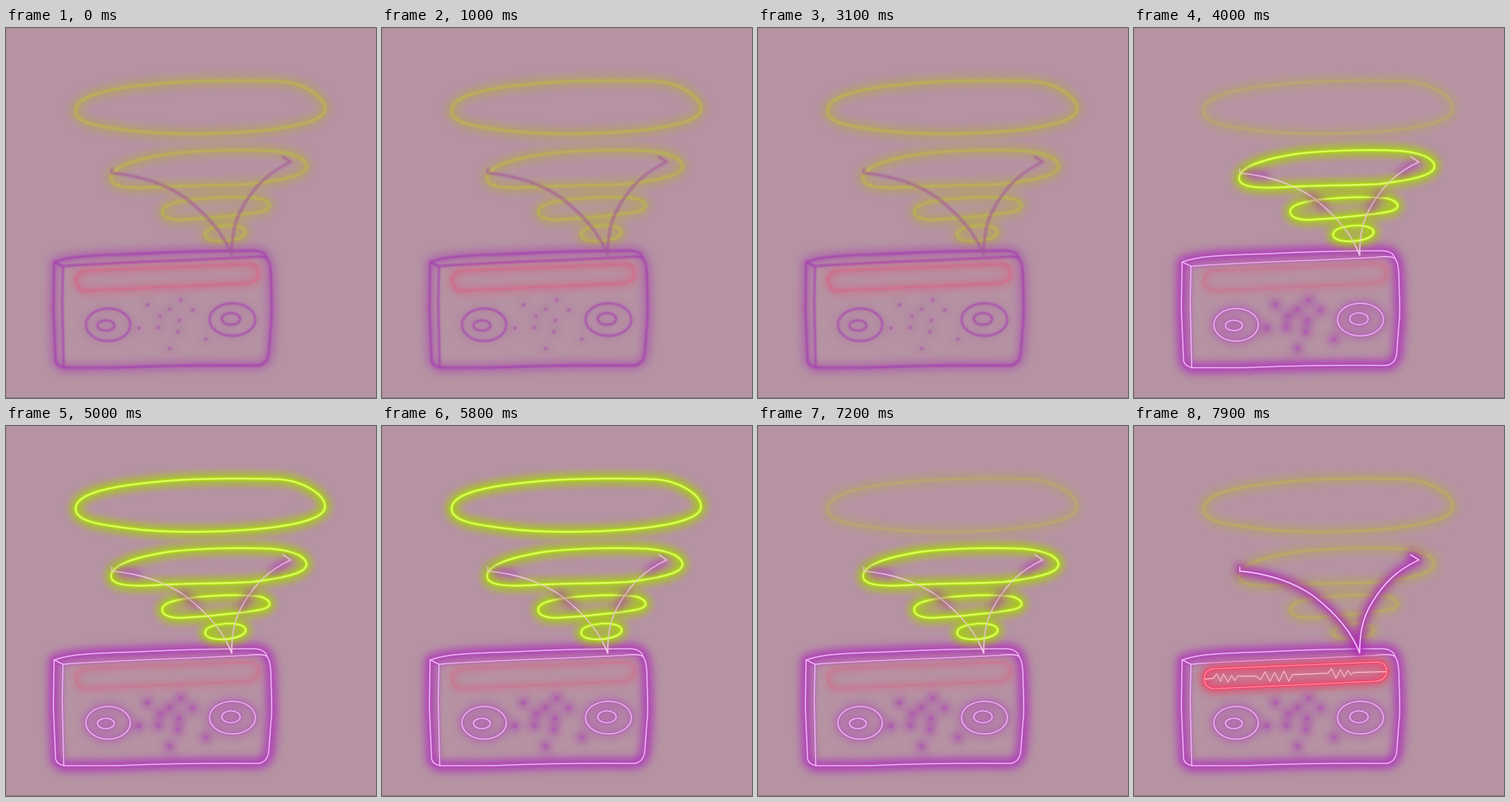
Write an HTML page that moves like this. It is 500 px wide and 500 px high and loops after 8000 ms.

```html
<!DOCTYPE html>
<html lang="en">
<head>
<meta charset="utf-8">
<title>Neon radio</title>
<style>
  html, body { margin: 0; width: 100%; height: 100%; overflow: hidden; background: #b693a3; }
  svg { display: block; width: 100vw; height: 100vh; }
  path, ellipse { fill: none; stroke-linecap: round; stroke-linejoin: round; }
  .glow { filter: url(#wide); }
  .soft { filter: url(#soft); }

  /* radio: blinks once a second, then stays on */
  .power, .idle, .beam, .tips, .ring-set, .tuned, .untuned, .faded { animation: 8s step-end infinite; }
  .power { animation-name: power; }
  .idle { animation-name: idle; }
  @keyframes power {
    0%, 12.5%, 25%, 37.5% { opacity: 0; }
    6.25%, 18.75%, 31.25%, 43.75%, 100% { opacity: 1; }
  }
  @keyframes idle {
    0%, 12.5%, 25%, 37.5% { opacity: 1; }
    6.25%, 18.75%, 31.25%, 43.75%, 100% { opacity: 0; }
  }

  /* the signal is sent from 3.5 s to 7.5 s */
  .ring-set, .tips { animation-name: send; }
  .beam { animation-name: rest; }
  .faded { animation-name: fade; }
  .tuned { animation-name: tune; }
  .untuned { animation-name: untune; }
  @keyframes send { 0%, 93.75% { opacity: 0; } 43.75% { opacity: 1; } }
  @keyframes rest { 0%, 93.75% { opacity: 1; } 43.75% { opacity: 0; } }
  @keyframes fade { 0% { opacity: 1; } 43.75% { opacity: .65; } 93.75%, 100% { opacity: .8; } }
  @keyframes tune { 0% { opacity: 0; } 93.75%, 100% { opacity: 1; } }
  @keyframes untune { 0% { opacity: 1; } 43.75%, 100% { opacity: .7; } }

  /* rings join one by one, every 200 ms */
  .r2, .r3, .r4 { animation: .8s step-end -.5s infinite; }
  .r2 { animation-name: second; }
  .r3 { animation-name: third; }
  .r4 { animation-name: fourth; }
  @keyframes second { 0% { opacity: 0; } 25%, 100% { opacity: 1; } }
  @keyframes third { 0% { opacity: 0; } 50%, 100% { opacity: 1; } }
  @keyframes fourth { 0% { opacity: 0; } 75%, 100% { opacity: 1; } }

  .halo { filter: url(#wide); stroke: #a4d010; stroke-width: 12px; opacity: .9; }
  .tube { filter: url(#soft); stroke: #b2ec08; stroke-width: 4px; }
  .core { stroke: #e2ff6c; stroke-width: 2px; }
</style>
</head>
<body>
<svg viewBox="0 0 500 500">
  <defs>
    <filter id="wide" filterUnits="userSpaceOnUse" x="0" y="0" width="500" height="500"><feGaussianBlur stdDeviation="6"/></filter>
    <filter id="soft" filterUnits="userSpaceOnUse" x="0" y="0" width="500" height="500"><feGaussianBlur stdDeviation=".8"/></filter>

    <path id="outline" d="M65 316C90 307 130 307 180 305C240 302 300 301 335 301Q350 301 354 312Q358 320 358 340Q360 390 359 400L356 440Q353 455 340 456C260 455 200 457 150 459L78 460Q69 457 67 450L64 380Z"/>
    <g id="case">
      <path d="M66 316C90 307 130 307 180 305C240 302 300 301 335 301Q350 301 353 312"/>
      <path d="M65 316L77 322C130 318 180 316 240 314L325 310Q349 307 353 312Q358 318 358 340Q360 390 358 400L355 440Q353 455 340 456C260 455 200 457 150 459L78 459Q69 457 67 450L64 380Z"/>
      <path d="M77 322L76 370L78 459"/>
    </g>
    <g id="speakers">
      <ellipse cx="138" cy="401" rx="30" ry="22"/>
      <ellipse cx="135" cy="402" rx="11.5" ry="7"/>
      <ellipse cx="306" cy="394" rx="31" ry="22"/>
      <ellipse cx="304" cy="393" rx="12.5" ry="8"/>
    </g>
    <path id="dots" d="M191 374h.1M208 389.500h.1M221 380h.1M236 368h.1M252 381h.1M234 395h.1M206 405h.1M179.500 405.500h.1M232 410.500h.1M221 433h.1M270 420.500h.1"/>
    <path id="antenna" d="M143 191V196C185 200 216 211 243 230C275 255 295 280 305 307C305 285 307 262 322 238C338 212 355 195 385 181L374 174"/>
    <path id="screen" d="M108 328L328 319Q342 319 341 333Q340 344 325 345L108 355Q95 354 95 341Q96 329 108 328Z"/>
    <path id="ring1" d="M269 279C270 271 285 268 297 267C312 266 324 270 324 276C323 283 310 287 297 288C283 289 269 287 269 279Z"/>
    <path id="ring2" d="M211 248C211 238 232 234 260 231C290 228 320 228 340 230C352 232 357 237 356 242C354 248 335 250 310 253C285 256 260 258 240 259C225 260 211 257 211 248Z"/>
    <path id="ring3" d="M142 203C142 188 175 177 220 170C260 165 320 164 360 166C390 169 406 177 406 187C406 200 370 206 330 211C280 213 240 213 205 215C170 217 142 216 142 203Z"/>
    <path id="ring4" d="M94 111C96 93 130 84 180 78C240 70 310 70 370 72C400 74 431 92 431 109C431 127 380 136 330 140C280 144 220 144 180 140C130 134 93 130 94 111Z"/>
    <g id="rings"><use href="#ring1"/><use href="#ring2"/><use href="#ring3"/><use href="#ring4"/></g>
  </defs>

  <path d="M0 499.500H500" stroke="#8d7480"/>
  <path d="M.5 0V500" stroke="#a98b98"/>

  <g class="faded">
    <use href="#rings" class="glow" stroke="#b3a948" stroke-width="12" opacity=".65"/>
    <use href="#rings" class="soft" stroke="#bcb84c" stroke-width="3" opacity=".85"/>
  </g>

  <g class="idle">
    <use href="#outline" class="glow" stroke="#a640b0" stroke-width="11" opacity=".6"/>
    <use href="#speakers" class="glow" stroke="#a650aa" stroke-width="6" opacity=".3"/>
    <use href="#dots" class="glow" stroke="#a650aa" stroke-width="12" opacity=".3"/>
    <g class="soft" stroke="#a43bb0">
      <use href="#case" stroke-width="2.800" opacity=".8"/>
      <use href="#speakers" stroke-width="2.400" opacity=".8"/>
      <use href="#dots" stroke-width="3.500" opacity=".8"/>
    </g>
    <use href="#antenna" class="soft" stroke="#a4559a" stroke-width="3.500" opacity=".65"/>
  </g>

  <g class="power">
    <use href="#outline" class="glow" stroke="#ac2cba" stroke-width="14" opacity=".82"/>
    <use href="#speakers" class="glow" stroke="#ac3ab8" stroke-width="8" opacity=".55"/>
    <use href="#dots" class="glow" stroke="#a62fb2" stroke-width="15" opacity=".6"/>
    <use href="#case" class="soft" stroke="#b84ac6" stroke-width="3.500" opacity=".5"/>
    <use href="#speakers" class="soft" stroke="#b44cc2" stroke-width="3.500" opacity=".5"/>
    <use href="#dots" class="soft" stroke="#a530b0" stroke-width="4" opacity=".7"/>
    <use href="#dots" stroke="#d88ade" stroke-width="1.500"/>
    <g stroke="#eeb4f2" stroke-width="1.600">
      <use href="#case"/>
      <use href="#speakers"/>
    </g>
    <g class="beam">
      <use href="#antenna" class="glow" stroke="#a91fb8" stroke-width="11" opacity=".85"/>
      <use href="#antenna" class="soft" stroke="#b433c2" stroke-width="3.500" opacity=".7"/>
    </g>
    <use href="#antenna" stroke="#f0c0f0" stroke-width="1.800"/>
  </g>

  <g class="untuned">
    <use href="#screen" class="glow" stroke="#e0507a" stroke-width="9" opacity=".5"/>
    <use href="#screen" class="soft" stroke="#e2587f" stroke-width="2.500" opacity=".5"/>
  </g>
  <g class="tuned">
    <use href="#screen" class="glow" stroke="#f0305a" stroke-width="9" opacity=".7"/>
    <path d="M108 328L328 319Q342 319 341 333Q340 344 325 345L108 355Q95 354 95 341Q96 329 108 328Z" style="fill:#e2507a" opacity=".35"/>
    <use href="#screen" class="soft" stroke="#ff3d62" stroke-width="3.200"/>
    <use href="#screen" stroke="#ff9aac" stroke-width="1.200"/>
    <path d="M96 342L107 341L112 335L117 345L121 335L127 346L132 337L136 344L140 338H165L171 343L177 332L184 345L190 333L196 345L203 331L209 345L214 336L262 334L267 328L273 341L279 329L284 339L289 330L293 336L297 333L340 332" stroke="#ffb4c0" stroke-width="1.300"/>
  </g>

  <g class="ring-set">
    <g class="r1"><use href="#ring1" class="halo"/><use href="#ring1" class="tube"/><use href="#ring1" class="core"/></g>
    <g class="r2"><use href="#ring2" class="halo"/><use href="#ring2" class="tube"/><use href="#ring2" class="core"/></g>
    <g class="r3"><use href="#ring3" class="halo"/><use href="#ring3" class="tube"/><use href="#ring3" class="core"/></g>
    <g class="r4"><use href="#ring4" class="halo"/><use href="#ring4" class="tube"/><use href="#ring4" class="core"/></g>
  </g>

  <!-- what shows of the antenna between the rings -->
  <g class="tips">
    <path class="glow" d="M152 196L178 200M238 227L258 242M318 245L332 224M360 196L382 182" stroke="#a62cb2" stroke-width="10" opacity=".65"/>
    <use href="#antenna" stroke="#f0c0e4" stroke-width="1.500" opacity=".7"/>
  </g>
</svg>
</body>
</html>
```
